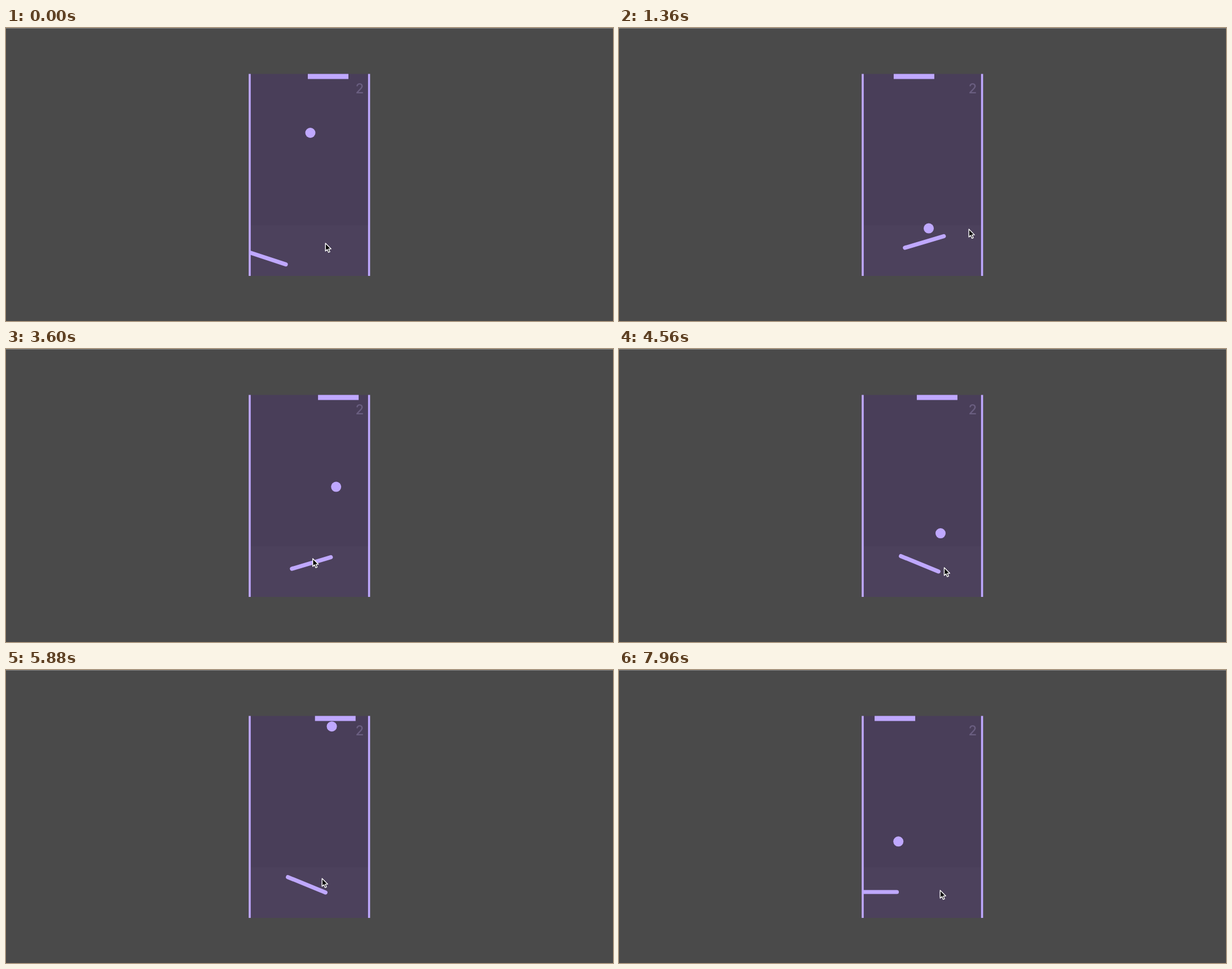
Recreate the animation shown at these times as an HTML page. Size 1076x520 px, loop 8 s.

```html
<!DOCTYPE html>
<html lang="en">
<head>
<meta charset="utf-8">
<title>Paddle game</title>
<style>
  html, body { margin: 0; width: 100%; height: 100%; overflow: hidden; background: #4a4a4a; }
  svg { display: block; width: 100%; height: 100%; }
  .lit { fill: #bfa8ff; }
  text { font: 500 24px Inter, "Liberation Sans", sans-serif; fill: #6a5e80; text-anchor: middle; }
</style>
</head>
<body>
<svg viewBox="0 0 1076 520">
  <defs><clipPath id="field"><rect x="433" y="81.5" width="210" height="358.5"/></clipPath></defs>
  <rect width="1076" height="520" fill="#4a4a4a"/>
  <rect width="1076" height="1" fill="#858585"/>
  <rect x="432" y="81.5" width="212" height="358.5" fill="#493e59"/>
  <rect x="432" y="350" width="212" height="90" fill="#4c415c"/>
  <text x="627" y="115.5">2</text>
  <g clip-path="url(#field)">
    <line id="bar" x1="-36" x2="36" stroke="#bfa8ff" stroke-width="7.2" stroke-linecap="round"/>
  </g>
  <rect class="lit" x="430.2" y="81.5" width="3.6" height="358.5"/>
  <rect class="lit" x="641.8" y="81.5" width="3.6" height="358.5"/>
  <rect id="paddle" class="lit" x="-36" y="81.5" width="72" height="9"/>
  <circle id="ball" class="lit" r="9"/>
  <path id="cursor" d="M.3 .5V14.4L3.4 11.4L5.7 16.7L8.1 15.7L5.9 10.6H10.2Z"
    fill="#000" stroke="#fff" stroke-width="1.4" stroke-linejoin="round"/>
</svg>
<script>
const LOOP = 8000, STEP = 40, DT = 2;
const RAD = Math.PI / 180;

const SPEED = 0.1944;                         // ball, px per ms
const LEFT = 443, RIGHT = 633, TOP = 100;     // limits of the ball's centre
const REACH = 12.6, HALF = 36;                // ball to bar distance, half a bar
const PADDLE_SPEED = 0.095, PADDLE_LAG = 72;

// Where the pointer goes; a press lays a bar that points at the next stop
const stops = [
  { t: 0, x: 566, y: 381.5 },
  { t: 960, x: 541.3, y: 379.8, press: true },
  { t: 1280, x: 620, y: 356.4 },
  { t: 2400, x: 616.5, y: 365.5 },
  { t: 3600, x: 543.5, y: 371.5 },
  { t: 3760, x: 533, y: 381.2, press: true },
  { t: 4120, x: 576, y: 398.8 },
  { t: 4240, x: 578, y: 389.5 },
  { t: 5880, x: 560, y: 369.5 },
  { t: 7000, x: 456.5, y: 394, press: true },
  { t: 7440, x: 569, y: 394 },
  { t: LOOP - STEP, x: 569, y: 390.5 }
];

const bars = [{ t: 0, x: 461.8, y: 408.2, angle: 18.3 * RAD }];
stops.forEach(({ t, x, y, press }, i) => {
  const aim = stops[i + 1];
  if (press) bars.push({ t, x, y, angle: Math.atan2(aim.y - y, aim.x - x) });
});

const clamp = (v, lo, hi) => Math.min(hi, Math.max(lo, v));
const barAt = t => bars.filter(b => b.t <= t).pop();

function cursorAt(t) {
  const i = stops.findIndex(s => s.t > t);
  if (i < 0) return stops[stops.length - 1];
  const a = stops[i - 1], b = stops[i];
  const u = (t - a.t) / (b.t - a.t), k = u * u * (3 - 2 * u);
  return { x: a.x + (b.x - a.x) * k, y: a.y + (b.y - a.y) * k };
}

function bounceOffBar(ball, bar) {
  const ux = Math.cos(bar.angle), uy = Math.sin(bar.angle);
  const dx = ball.x - bar.x, dy = ball.y - bar.y;
  const s = clamp(dx * ux + dy * uy, -HALF, HALF);
  const near = Math.hypot(dx - s * ux, dy - s * uy) < REACH;
  const closing = ball.vx * uy - ball.vy * ux < 0;
  if (!near || !closing) return;
  const dot = ball.vx * ux + ball.vy * uy;
  ball.vx = 2 * dot * ux - ball.vx;
  ball.vy = 2 * dot * uy - ball.vy;
}

function moveBall(ball, bar) {
  ball.x += ball.vx * DT;
  ball.y += ball.vy * DT;
  if (ball.x < LEFT) ball.vx = Math.abs(ball.vx);
  if (ball.x > RIGHT) ball.vx = -Math.abs(ball.vx);
  if (ball.y < TOP) ball.vy = Math.abs(ball.vy);
  bounceOffBar(ball, bar);
}

function chase(paddle, ball) {
  const v = clamp((ball.x - paddle) / PADDLE_LAG, -PADDLE_SPEED, PADDLE_SPEED);
  return clamp(paddle + v * DT, 472, 604);
}

// Play the game once and keep the pose of every step
function play() {
  const heading = 140.1 * RAD;
  const ball = { x: 539.5, y: 186, vx: SPEED * Math.cos(heading), vy: SPEED * Math.sin(heading) };
  const poses = [];
  let paddle = 571;
  for (let t = 0; t < LOOP; t += DT) {
    const bar = barAt(t);
    if (t % STEP === 0) {
      poses.push({ ball: { ...ball }, paddle: { x: paddle, y: 0 }, bar, cursor: cursorAt(t) });
    }
    moveBall(ball, bar);
    paddle = chase(paddle, ball);
  }
  return poses;
}

const poses = play();

function draw(now) {
  const pose = poses[Math.floor((now % LOOP) / STEP)];
  for (const [id, { x, y, angle = 0 }] of Object.entries(pose)) {
    document.getElementById(id).setAttribute("transform", `translate(${x} ${y}) rotate(${angle / RAD})`);
  }
}

let start;
function tick(now) {
  start ??= now;
  draw(now - start);
  requestAnimationFrame(tick);
}
draw(0);
requestAnimationFrame(tick);
</script>
</body>
</html>
```
